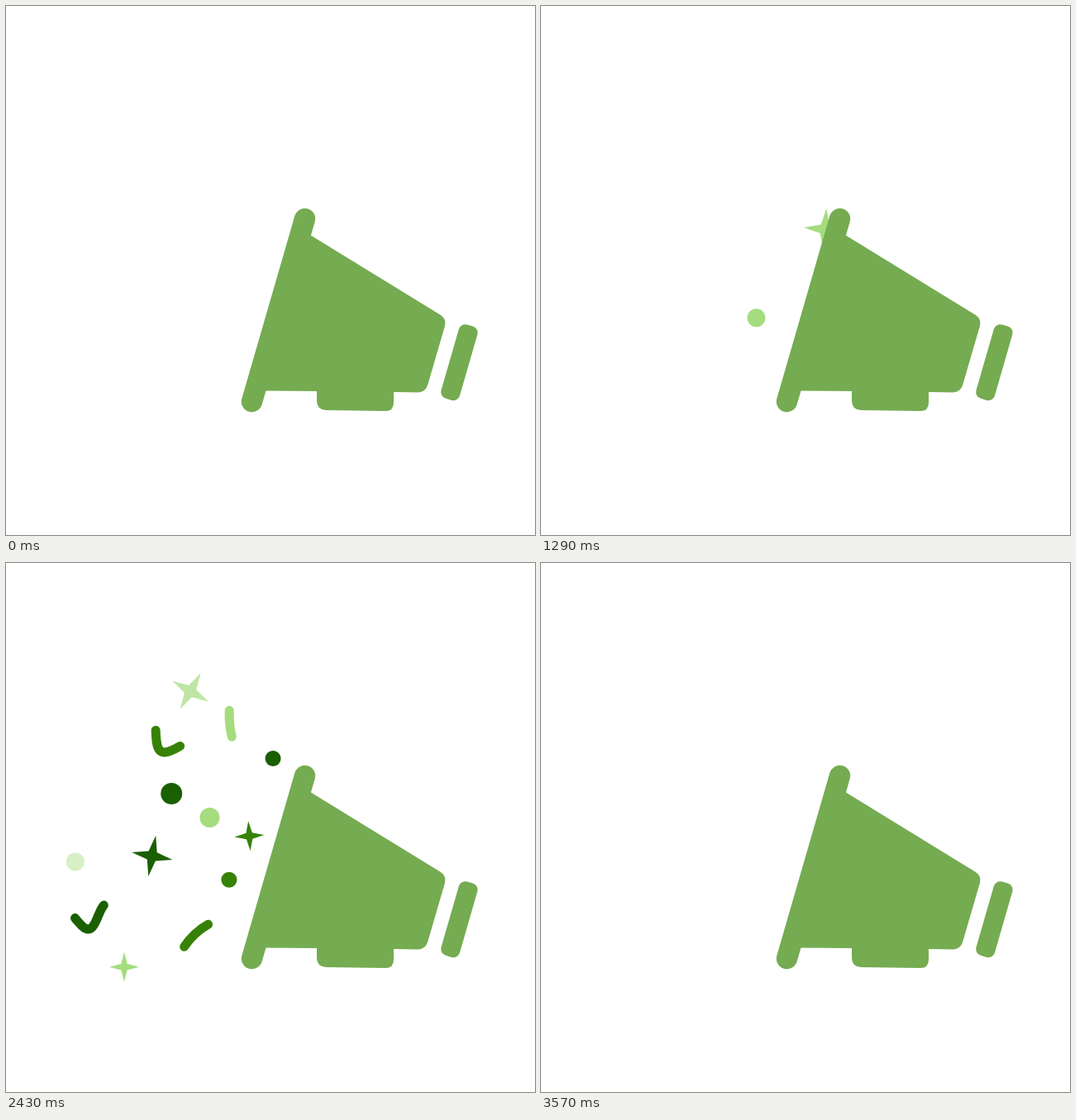
These frames come from a looping animation (640x640 px, 3.64 s). An HTML page with a canvas:

```html
<!DOCTYPE html>
<html lang="en">
<head>
<meta charset="utf-8">
<title>Confetti megaphone</title>
<style>
html, body { margin: 0; width: 100%; height: 100%; overflow: hidden; background: #fff; }
canvas { display: block; width: 100vmin; height: 100vmin; }
</style>
</head>
<body>
<canvas width="640" height="640"></canvas>
<script>
const ctx = document.querySelector('canvas').getContext('2d');
const LOOP = 3640, STEPS = 51, RAD = Math.PI / 180;
const GREEN = '#75ab51', LIGHT = '#a4dc7e', MID = '#358207', DARK = '#1a5f02';

const clamp = v => Math.min(1, Math.max(0, v));
const mix = (a, b, u) => a + (b - a) * u;
const ease = v => (1 - Math.cos(Math.PI * clamp(v))) / 2;

// A sine wave that leaves (x, y) at a trough and runs left, tilted by deg.
function wave(x, y, deg, period, amp, turns) {
  const path = new Path2D(), dx = -Math.cos(deg * RAD), dy = -Math.sin(deg * RAD);
  for (let a = 0; a <= period * turns; a++) {
    const n = amp * (1 - Math.cos(2 * Math.PI * a / period));
    path.lineTo(x + a * dx - n * dy, y + a * dy + n * dx);
  }
  return path;
}

// Stars are the pieces that turn (degrees over the whole flight).
const pieces = [
  { color: LIGHT, r: 11, x: 83.8, y: 361.5, from: 205, to: 2365 },
  { color: DARK, r: 13, x: 149, y: 258, from: 511, to: 3161 },
  { color: LIGHT, r: 12, x: 213, y: 295, from: 521, to: 3071 },
  { color: DARK, r: 9.5, x: 321, y: 234, from: 462, to: 2608 },
  { color: MID, r: 9.5, x: 240, y: 381, from: 601, to: 3051 },
  { color: LIGHT, r: 25.3, x: 223, y: 155, from: 293, to: 2448, turn: 525 },
  { color: LIGHT, r: 18, x: 140, y: 489.5, from: 280, to: 2573, turn: -409 },
  { color: DARK, r: 25, x: 152.5, y: 351, from: 337, to: 2912, turn: -333 },
  { color: MID, r: 18, x: 257.5, y: 316, from: 290, to: 3340, turn: -288 }
];

const ribbons = [
  { color: DARK, from: 1303, speed: .163, length: 57, path: wave(207, 427, -8.5, 54, 14, 2.45) },
  { color: MID, from: 1807, speed: .212, length: 52, path: wave(249, 262, 29, 70, 18, 2.15) },
  { color: MID, from: 1796, speed: .11, length: 40, path: new Path2D('M272 427Q206 441 195 525') },
  { color: LIGHT, from: 1568, speed: .136, length: 32, path: new Path2D('M315 283Q249 211 280 136') }
];

const body = new Path2D('M368 277L526 374Q533 379 531 387L510 459Q507 467 499 467.5L469 467V480Q469 490 459 490L387 489Q376 488 376 478V466L313 465.5L297 478L361 257Z');
const rim = new Path2D('M361.5 257.5L297.5 478.5');

function drawPiece(t, { color, r, x, y, from, to, turn }) {
  const u = ease((t - from) / (to - from));
  ctx.save();
  ctx.globalAlpha = 1 - clamp((t - to + 120) / 333);
  ctx.fillStyle = color;
  ctx.translate(mix(437, x, u), mix(335 + .16 * y, y, u));
  ctx.beginPath();
  if (turn) {
    ctx.rotate((45 + turn * u) * RAD);
    for (let i = 0; i < 8; i++) {
      const d = i % 2 ? r * .29 : r, a = i * Math.PI / 4;
      ctx.lineTo(d * Math.sin(a), -d * Math.cos(a));
    }
  } else {
    ctx.arc(0, 0, r, 0, 2 * Math.PI);
  }
  ctx.fill();
  ctx.restore();
}

function drawRibbon(t, { color, from, speed, length, path }) {
  const head = (t - from) * speed, tail = Math.max(0, head - length);
  if (head <= 0) return;
  ctx.save();
  ctx.strokeStyle = color;
  ctx.lineWidth = 11;
  ctx.lineCap = 'round';
  ctx.lineJoin = 'round';
  ctx.setLineDash([head - tail, 9999]);
  ctx.lineDashOffset = -tail;
  ctx.stroke(path);
  ctx.restore();
}

function drawMegaphone(t) {
  const s = 1 - .133 * ease(1 - Math.abs(t - 933) / 267);
  ctx.save();
  ctx.translate(428, 367);
  ctx.scale(s, s);
  ctx.translate(-428, -367);
  ctx.fillStyle = ctx.strokeStyle = GREEN;
  ctx.fill(body);
  ctx.lineWidth = 25.4;
  ctx.lineCap = 'round';
  ctx.stroke(rim);
  ctx.translate(548.4, 431.2);
  ctx.rotate(16.1 * RAD);
  ctx.beginPath();
  ctx.roundRect(-11.7, -46.5, 23.4, 93, 8);
  ctx.fill();
  ctx.restore();
}

function draw(now) {
  const step = Math.floor((now % LOOP + 4) * STEPS / LOOP) % STEPS;
  const t = step * LOOP / STEPS;
  ctx.fillStyle = '#fff';
  ctx.fillRect(0, 0, 640, 640);
  pieces.forEach(p => drawPiece(t, p));
  ribbons.forEach(r => drawRibbon(t, r));
  drawMegaphone(t);
}

const begin = performance.now();
function tick() {
  draw(performance.now() - begin);
  requestAnimationFrame(tick);
}
tick();
</script>
</body>
</html>
```
